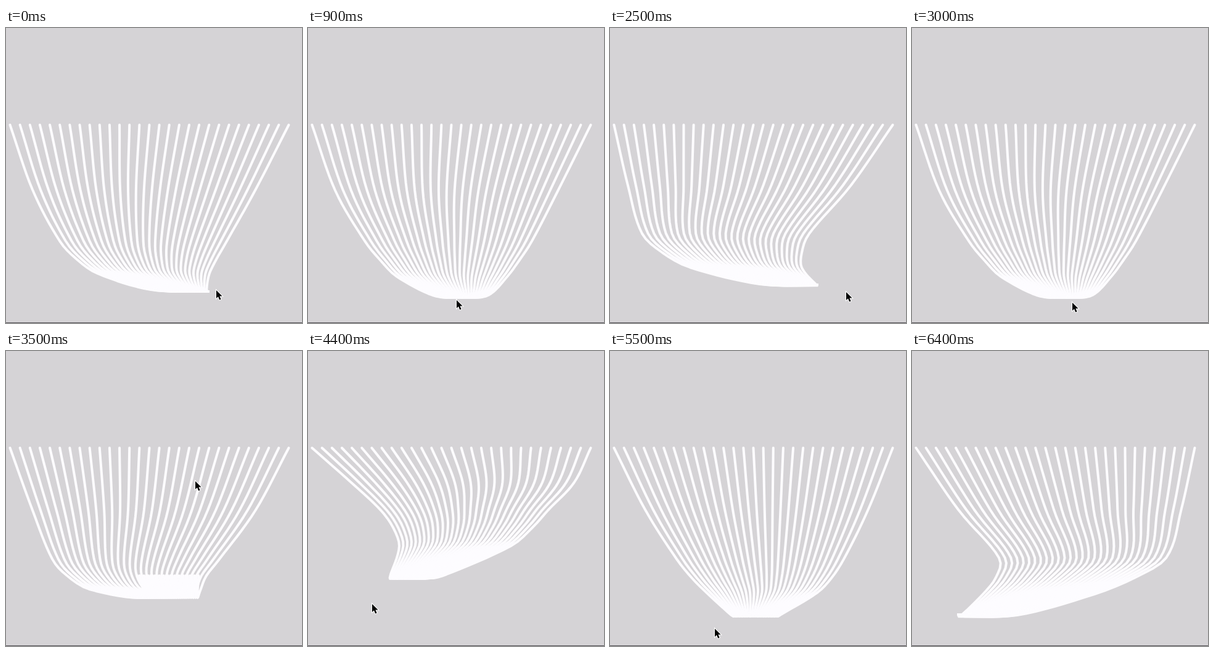
Recreate the animation shown at these times as an HTML page with a canvas. Size 480 by 478 pixels, loop 6.5 s.

```html
<!DOCTYPE html>
<html lang="en">
<head>
<meta charset="utf-8">
<title>Hanging strings</title>
<style>
  html, body { margin: 0; width: 100%; height: 100%; overflow: hidden; background: #d5d3d6; }
  canvas { display: block; }
</style>
</head>
<body>
<canvas id="stage" width="480" height="478"></canvas>
<script>
const ctx = document.getElementById('stage').getContext('2d');
const LOOP = 6500, STEP = 100;
const STRINGS = 29, LEFT = 6.5, SPAN = 452, TOP = 157;

// Strings draw together linearly along their depth; only the tip spread varies.
const DEPTH = [0, .2, .4, .5, .6, .8, 1];

// Each pose: x of the leftmost string and shared y below the top, then tip spread.
const POSES = {
  right:   { x: [43, 87, 115, 149, 235, 328], y: [262, 345, 375, 398, 424, 427], tip: 0 },
  centre:  { x: [44, 92, 117, 143, 202, 245], y: [263, 345, 376, 402, 433, 437], tip: .02 },
  whip:    { x: [29, 52, 85, 130, 243, 336],  y: [255, 333, 364, 388, 415, 416], tip: 0 },
  lifted:  { x: [43, 75, 99, 135, 220, 213],  y: [258, 337, 364, 386, 399, 364], tip: .22 },
  pulled:  { x: [70, 118, 138, 148, 134, 133], y: [213, 258, 286, 316, 362, 369], tip: .125 },
  settled: { x: [57, 108, 133, 156, 192, 200], y: [257, 337, 368, 391, 424, 430], tip: .16 },
  left:    { x: [75, 141, 136, 115, 80, 75],  y: [257, 335, 367, 394, 428, 427], tip: 0 }
};

// A minus sign mirrors the pose.
const SWING = [
  [0, 'right'], [450, '-right'], [900, 'centre'], [1400, 'right'], [2000, '-right'],
  [2500, 'whip'], [3000, 'centre'], [3500, 'lifted'], [4400, 'pulled'],
  [4900, 'whip'], [5500, 'settled'], [6000, 'right'], [6400, 'left']
];

const POINTER = [
  [0, 341, 425], [450, 120, 452], [900, 241, 441], [1400, 380, 440], [2000, 100, 457],
  [2500, 383, 428], [3000, 260, 445], [3500, 307, 211], [3700, 280, 12],
  [4400, 104, 410], [4800, 464, 390], [5500, 170, 450], [6000, 457, 436], [6300, -40, 436], [6400, -60, 436]
];

// Smooth curve through rows of numbers at the given knots.
function spline(knots, rows, t) {
  const last = knots.length - 1;
  let i = 0;
  while (i < last - 1 && t > knots[i + 1]) i++;
  const before = Math.max(i - 1, 0), after = Math.min(i + 2, last);
  const size = knots[i + 1] - knots[i];
  const u = Math.min(1, Math.max(0, (t - knots[i]) / size));
  const u2 = u * u, u3 = u2 * u;
  return rows[i].map((a, n) => {
    const b = rows[i + 1][n];
    const slopeA = (b - rows[before][n]) / (knots[i + 1] - knots[before]) * size;
    const slopeB = (rows[after][n] - a) / (knots[after] - knots[i]) * size;
    return a * (2 * u3 - 3 * u2 + 1) + b * (3 * u2 - 2 * u3)
      + slopeA * (u3 - 2 * u2 + u) + slopeB * (u3 - u2);
  });
}

// Flattens a pose to left x, right x and y for every node.
function flatten(name) {
  const mirrored = name[0] === '-';
  const pose = POSES[name.replace('-', '')];
  const xs = [LEFT, ...pose.x], ys = [TOP, ...pose.y];
  return DEPTH.flatMap((depth, k) => {
    const width = SPAN * (depth === 1 ? pose.tip : 1 - depth);
    const x = mirrored ? 2 * LEFT + SPAN - xs[k] - width : xs[k];
    return [x, x + width, ys[k]];
  });
}

const swingTimes = SWING.map(([time]) => time);
const swingRows = SWING.map(([, name]) => flatten(name));
const pointerTimes = POINTER.map(([time]) => time);
const pointerRows = POINTER.map(([, x, y]) => [x, y]);

function drawStrings(t) {
  const flat = spline(swingTimes, swingRows, t);
  const nodes = DEPTH.map((_, k) => flat.slice(3 * k, 3 * k + 3));
  const samples = Array.from({ length: 41 }, (_, s) => spline(DEPTH, nodes, s / 40));
  ctx.strokeStyle = '#fdfcff';
  ctx.lineWidth = 4;
  ctx.lineCap = ctx.lineJoin = 'round';
  for (let i = 0; i < STRINGS; i++) {
    const f = i / (STRINGS - 1);
    ctx.beginPath();
    for (const [l, r, y] of samples) ctx.lineTo(l + (r - l) * f, y);
    ctx.stroke();
  }
}

function drawPointer(t) {
  const [x, y] = spline(pointerTimes, pointerRows, t);
  ctx.save();
  ctx.translate(x, y);
  ctx.beginPath();
  for (const [px, py] of [[0, 0], [0, 13], [3, 10.3], [5.2, 15.5], [7.6, 14.5], [5.4, 9.4], [9.6, 9.4]])
    ctx.lineTo(px, py);
  ctx.closePath();
  ctx.lineJoin = 'miter';
  ctx.lineWidth = 2;
  ctx.strokeStyle = '#fff';
  ctx.stroke();
  ctx.fillStyle = '#000';
  ctx.fill();
  ctx.restore();
}

const start = performance.now();
function frame() {
  const t = Math.floor((performance.now() - start) % LOOP / STEP) * STEP;
  ctx.fillStyle = '#d5d3d6';
  ctx.fillRect(0, 0, 480, 478);
  ctx.fillStyle = '#565458';
  ctx.fillRect(0, 477, 480, 1);
  drawStrings(t);
  drawPointer(t);
  requestAnimationFrame(frame);
}
frame();
</script>
</body>
</html>
```
